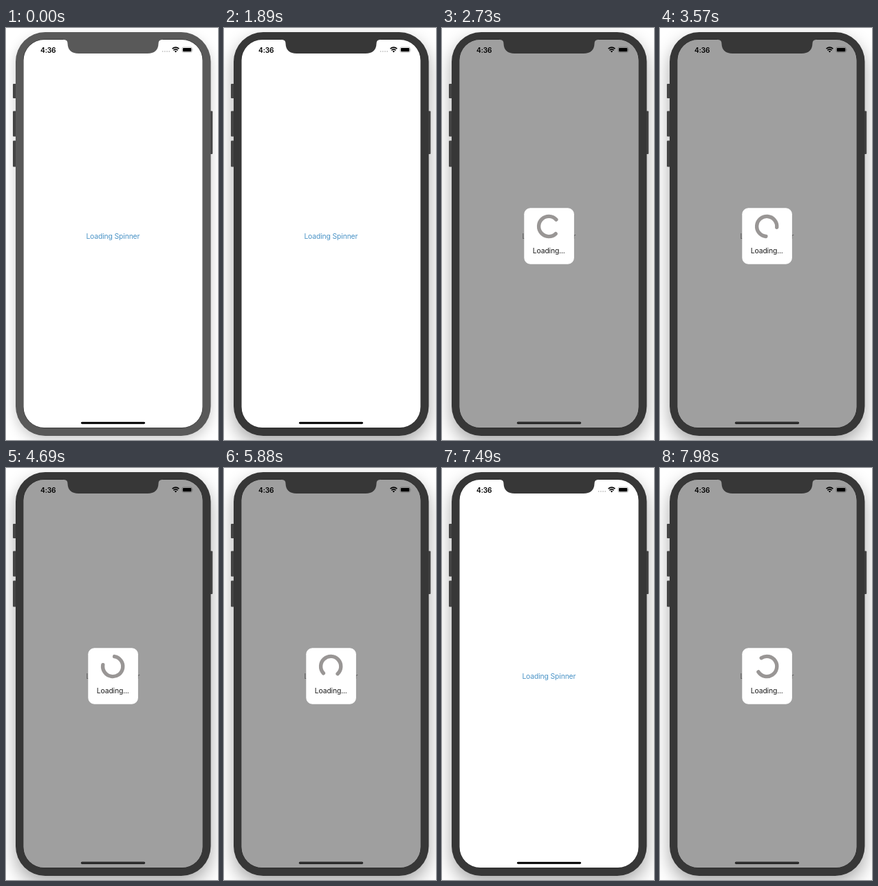
These frames come from a looping animation (308x598 px, 8000 ms). An HTML page:

```html
<!DOCTYPE html>
<html lang="en">
<head>
<meta charset="utf-8">
<title>Loading spinner</title>
<style>
  html, body { margin: 0; width: 100%; height: 100%; overflow: hidden; background: #fff; }
  svg { display: block; width: 308px; height: 598px; }
  text { font: 400 10.4px Inter, "Open Sans", sans-serif; letter-spacing: -.15px; }
  .clock { font-size: 10.2px; font-weight: 600; }
</style>
</head>
<body>
<svg viewBox="0 0 308 598">
  <defs>
    <filter id="soft" x="-30%" y="-20%" width="160%" height="140%">
      <feGaussianBlur id="blur" stdDeviation="13"/>
    </filter>
    <clipPath id="screen"><rect x="25.5" y="17" width="260" height="563" rx="30"/></clipPath>
  </defs>

  <rect id="shadow" x="14" y="6" width="283.5" height="586" rx="43" filter="url(#soft)"/>

  <g id="buttons" fill="#444">
    <rect x="10" y="81" width="6" height="21" rx="1"/>
    <rect x="10" y="120.5" width="6" height="37" rx="1"/>
    <rect x="10" y="163.5" width="6" height="38" rx="1"/>
    <rect x="295" y="120.5" width="5.2" height="62.5" rx="1"/>
  </g>
  <rect id="bezel" x="14" y="6" width="283.5" height="586" rx="43"/>
  <rect x="25" y="16.5" width="261" height="564" rx="30.5" fill="#222"/>

  <g clip-path="url(#screen)">
    <rect x="25" y="16" width="262" height="565" fill="#fff"/>
    <text class="clock" x="50" y="35.6">4:36</text>
    <g id="signal" fill="#c4c4c4">
      <circle cx="227.6" cy="34" r=".9"/><circle cx="230.8" cy="34" r=".9"/>
      <circle cx="234" cy="34" r=".9"/><circle cx="237.2" cy="34" r=".9"/>
    </g>
    <g fill="none" stroke="#000" stroke-width="1.6">
      <path d="M241.6 30.2Q246.5 26 251.4 30.2"/>
      <path d="M243.4 32.3Q246.5 29.6 249.6 32.3"/>
    </g>
    <path d="M244.8 33.7Q246.5 32.3 248.2 33.7L246.5 35.5Z"/>
    <rect x="255.9" y="27.9" width="14.4" height="7.4" rx="2" fill="none" stroke="#000" stroke-opacity=".35" stroke-width=".7"/>
    <rect x="256.9" y="28.9" width="12.4" height="5.4" rx="1.2"/>
    <path d="M271.1 30.4q1.1 1.2 0 2.4z" opacity=".4"/>
    <text id="label" x="116.4" y="306">Loading Spinner</text>
    <rect x="109" y="571.8" width="93" height="2.9" rx="1.45"/>

    <g id="hud">
      <rect x="25" y="16" width="262" height="565" fill="#000" opacity=".375"/>
      <rect x="109" y="571.8" width="93" height="2.9" rx="1.45" fill="#2b2b2b"/>
      <rect x="119.3" y="261.3" width="72.6" height="81.4" rx="9" fill="#fff"/>
      <path id="ring" fill="none" stroke="#999695" stroke-width="5.4" stroke-linecap="round"/>
      <text x="131.8" y="327.4" fill="#1c1c1c">Loading...</text>
    </g>
  </g>
  <path id="notch" d="M83 16H228V17H226.5Q221.5 17.3 221.5 22.5Q221 37 205.5 37H105.5Q90 37 89.5 22.5Q89.5 17.3 84.5 17H83Z"/>
</svg>

<script>
  const LOOP = 8000, STEP = 70, TURN = 741;
  const FOCUS = 1890;
  const shows = [[1960, 5950], [7560, LOOP]];
  const CX = 155.2, CY = 288, R = 14.6;
  const el = id => document.getElementById(id);
  const set = (id, attrs) => {
    for (const key in attrs) el(id).setAttribute(key, attrs[key]);
  };

  // 270-degree arc whose opening is centred on the x axis
  const k = R * Math.SQRT1_2;
  set('ring', { d: `M${CX + k} ${CY + k}A${R} ${R} 0 1 1 ${CX + k} ${CY - k}` });

  function draw(time) {
    const t = Math.floor((time % LOOP) / STEP) * STEP;
    const active = t >= FOCUS;
    const show = shows.find(([from, to]) => t >= from && t < to);

    const frame = active ? '#373737' : '#595959';
    set('bezel', { fill: frame });
    set('notch', { fill: frame });
    set('shadow', { opacity: active ? .34 : .2, transform: `translate(0 ${active ? 11 : 7})` });
    set('blur', { stdDeviation: active ? 13 : 9 });
    set('hud', { visibility: show ? 'visible' : 'hidden' });
    set('signal', { visibility: show ? 'hidden' : 'visible' });
    set('label', { fill: show ? '#858585' : '#4a93c6' });
    if (show) {
      const angle = -12 + 360 * (t - show[0]) / TURN;
      set('ring', { transform: `rotate(${angle} ${CX} ${CY})` });
    }
  }

  let start;
  function tick(now) {
    start ??= now;
    draw(now - start);
    requestAnimationFrame(tick);
  }
  draw(0);
  requestAnimationFrame(tick);
</script>
</body>
</html>
```
